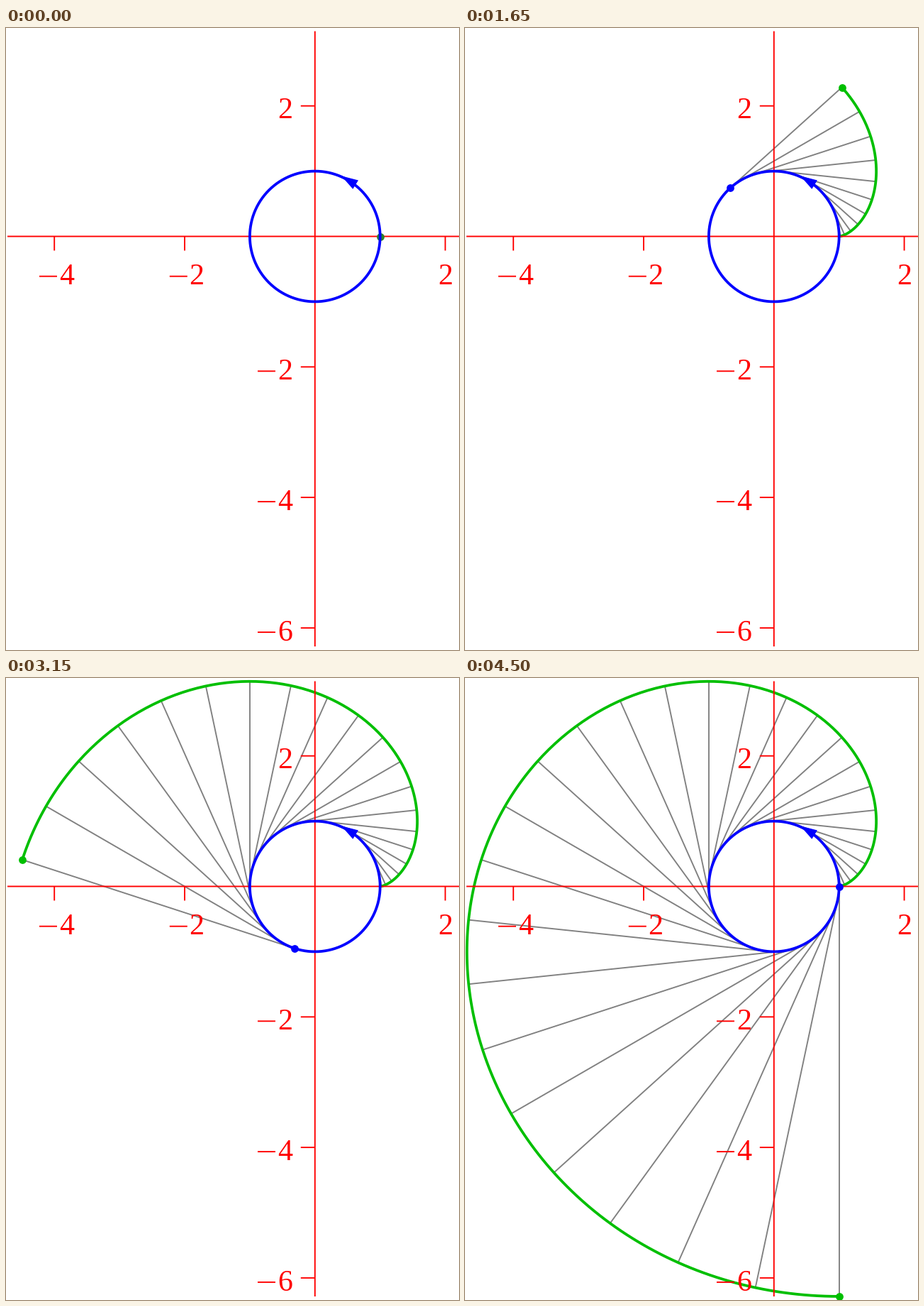
A matplotlib script for the animation above (4.65 s loop, 639 by 876 pixels).

```python
import numpy as np
import matplotlib.pyplot as plt
from matplotlib.animation import FuncAnimation
from matplotlib.collections import LineCollection

W, H, DPI = 639, 876, 64
PX = 72 / DPI                      # one pixel in points
CX, CY, UNIT = 435.8, 293.5, 91.9  # origin and unit length in pixels
STEPS = 30
RED, BLUE, GREEN, GRAY = "#ff0000", "#0000ff", "#00bf00", "#808080"

fig = plt.figure(figsize=(W / DPI, H / DPI), dpi=DPI, facecolor="white")
ax = fig.add_axes([0, 0, 1, 1])
ax.set(xlim=(0, W), ylim=(H, 0))
ax.axis("off")


def to_px(x, y):
    return np.column_stack([CX + UNIT * np.asarray(x), CY - UNIT * np.asarray(y)])


def circle(t):
    t = np.atleast_1d(t)
    return to_px(np.cos(t), np.sin(t))


def involute(t):
    t = np.atleast_1d(t)
    return to_px(np.cos(t) + t * np.sin(t), np.sin(t) - t * np.cos(t))


def stroke(points, color, width, z, cap="butt"):
    xs, ys = np.transpose(points)
    line, = ax.plot(xs, ys, color=color, lw=width * PX, zorder=z,
                    solid_capstyle=cap, solid_joinstyle="round", snap=False)
    return line


def dot(color, z):
    line, = ax.plot([], [], "o", ms=10.8 * PX, mew=0, color=color, zorder=z)
    return line


def label(value, x, base, minus_x):
    ax.text(x, base, str(abs(value)), color=RED, fontsize=42 * PX, zorder=8,
            family="Liberation Serif", ha="center", va="baseline")
    if value < 0:
        y = base - 11.6
        stroke([(minus_x - 12.5, y), (minus_x + 12.5, y)], RED, 1.9, 8)


# axes, ticks and labels
stroke([(2, CY), (W, CY)], RED, 1.9, 4)
stroke([(CX, 4.5), (CX, 871)], RED, 1.9, 4)
for v in (-4, -2, 2):
    x = CX + v * UNIT
    stroke([(x, CY), (x, CY + 20)], RED, 1.9, 4)
    label(v, x + (17 if v < 0 else 0.5), 361.3, x - 8.7)
for v in (2, -2, -4, -6):
    y = CY - v * UNIT
    stroke([(CX - 20, y), (CX, y)], RED, 1.9, 4)
    label(v, 394, y + 17.6, 367.5)

# unit circle with its direction arrow
stroke(circle(np.linspace(0, 2 * np.pi, 361)), BLUE, 3.8, 5)
ax.fill([473, 497, 489.3], [208.3, 214.5, 226.8], color=BLUE, lw=0, zorder=6)

tangents = LineCollection([], colors=GRAY, linewidths=1.9 * PX, zorder=2)
ax.add_collection(tangents)
curve = stroke([(0, 0)], GREEN, 3.8, 3, "round")
start_dot = dot("#2c802c", 4.5)
end_dot = dot(GREEN, 7)
touch_dot = dot(BLUE, 7)


def update(k):
    t = 2 * np.pi * np.arange(1, k + 1) / STEPS
    tangents.set_segments(list(np.stack([circle(t), involute(t)], axis=1)))
    end = 2 * np.pi * k / STEPS
    curve.set_data(*involute(np.linspace(0, end, 12 * k + 2)).T)
    touch_dot.set_data(*circle(end).T)
    end_dot.set_data(*involute(end).T)
    start_dot.set_data(*circle(0).T)
    start_dot.set_visible(k == 0)
    for artist in (curve, touch_dot, end_dot):
        artist.set_visible(k > 0)
    return tangents, curve, start_dot, end_dot, touch_dot


anim = FuncAnimation(fig, update, frames=STEPS + 1, interval=150,
                     repeat=True, repeat_delay=0, blit=False)
plt.show()
```
